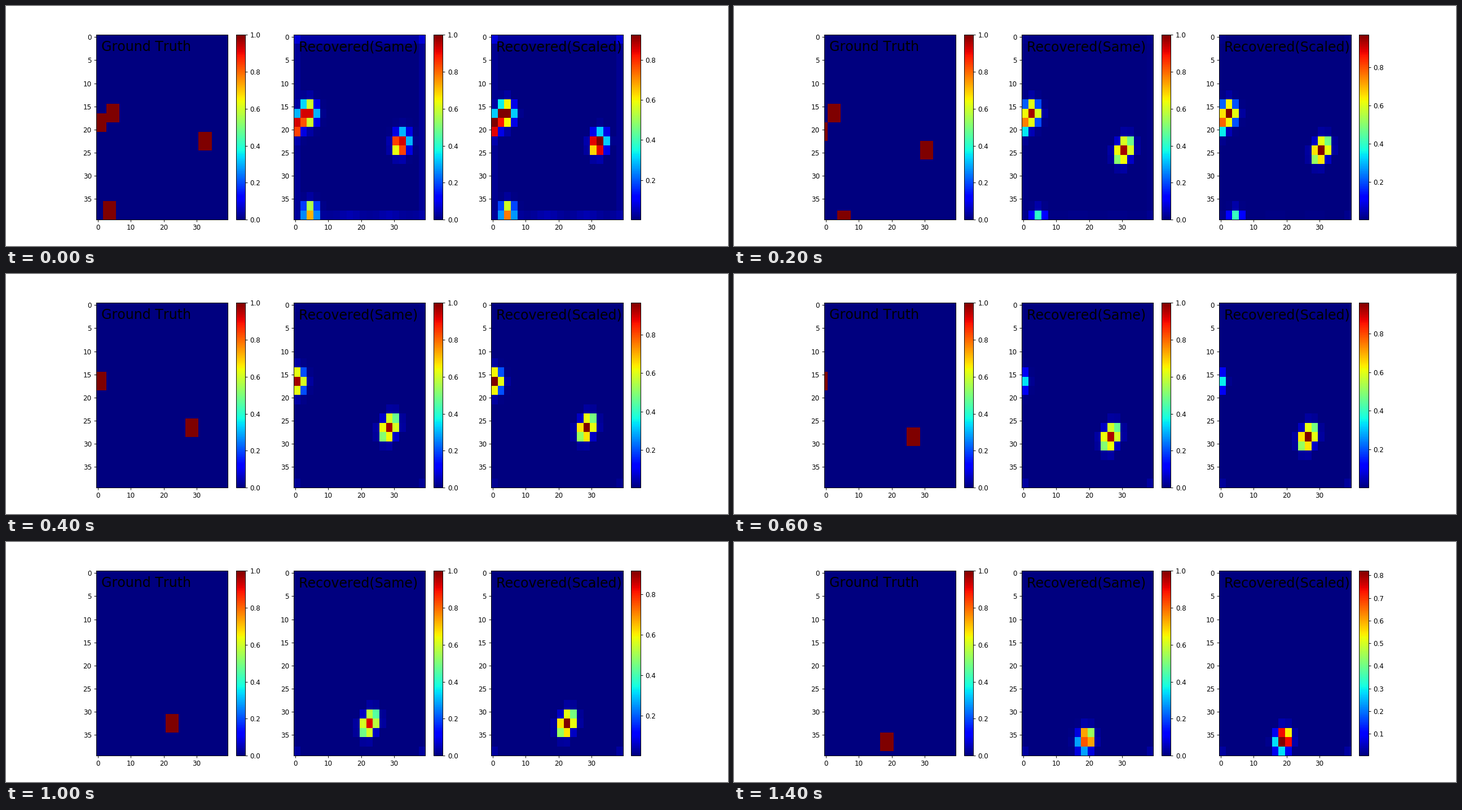
These frames come from a looping animation (1280x427 px, 1500 ms). A matplotlib script:

```python
import matplotlib.pyplot as plt
import numpy as np
from matplotlib.animation import FuncAnimation

STEPS, STEP_MS = 15, 100
N, CELL, SIDE = 40, 2, 4
M = N // CELL
DPI = 64
K = 256 / 3 / DPI  # layout is designed for 85.33 dpi

plt.rcParams.update({
    "font.family": "DejaVu Sans",
    "font.size": 10 * K,
    "text.kerning_factor": 6,
    "axes.linewidth": 0.8 * K,
    "image.cmap": "jet",
})
for axis in ("xtick", "ytick"):
    plt.rcParams[f"{axis}.major.size"] = 3.5 * K
    plt.rcParams[f"{axis}.major.width"] = 0.8 * K
    plt.rcParams[f"{axis}.major.pad"] = 3.5 * K

# Moving squares: start x, start y, x speed, y speed, level
SQUARES = [(3, 15, -1, 0, 1), (-1, 17, -1, 1, 1), (31, 21, -1, 1, 1)]
LEAVING = (2, 36, 1, 1, 1)
LEAVING_SEEN = (3, 36, 0, 1, 0.58)  # the estimate misses its sideways drift


def scene(step, squares, min_visible=1):
    grid = np.zeros((N, N))
    for x, y, vx, vy, level in squares:
        x, y = x + vx * step, y + vy * step
        if x + SIDE >= min_visible and y <= N - min_visible:
            rows = slice(max(y, 0), max(y + SIDE, 0))
            cols = slice(max(x, 0), max(x + SIDE, 0))
            grid[rows, cols] = level
    return grid


def coarse(step):
    """Share of each coarse cell that is covered, within the sequence."""
    step = min(max(step, 0), STEPS - 1)
    grid = scene(step, SQUARES + [LEAVING_SEEN], min_visible=2)
    return grid.reshape(M, CELL, M, CELL).mean(axis=(1, 3))


def haze(step):
    """Weak response along the borders, strongest at the start."""
    grid = np.zeros((M, M))
    grid[:, [0, -1]] = 0.018
    grid[0] = 0.025
    grid[-1] = 0.03 + 0.012 * np.cos((np.arange(M) - 14) * np.pi / 3)
    grid[0, [0, -1]] = 0.075
    grid *= np.exp(-step)
    grid[-1, [0, -1]] += 0.025 * min(step / 6, 1)
    return grid + 0.003


def recovered(step):
    # motion smear, then a contrast curve
    smear = 0.34 * coarse(step - 1) + 0.3 * coarse(step) + 0.36 * coarse(step + 1)
    v = np.minimum(1.2 * smear, 1)
    v = v * v * (3 - 2 * v)

    p = np.pad(v, 1)
    spill = p[:-2, 1:-1] + p[2:, 1:-1] + p[1:-1, :-2] + p[1:-1, 2:]
    peak = 0.97 - 0.045 * np.exp(-2 * step) - 0.15 * (step / (STEPS - 1)) ** 3
    grid = np.maximum(peak * np.maximum(v, 0.05 * spill), haze(step))
    return np.kron(grid, np.ones((CELL, CELL)))


fig, axes = plt.subplots(1, 3, figsize=(1280 / DPI, 427 / DPI), dpi=DPI,
                         gridspec_kw={"right": 0.8999})
images = []
for ax, label in zip(axes, ("Ground Truth", "Recovered(Same)", "Recovered(Scaled)")):
    image = ax.imshow(np.zeros((N, N)), vmin=0, vmax=1, aspect="auto")
    ax.text(1, 3, label, fontsize=20 * K)
    fig.colorbar(image, ax=ax)
    images.append(image)


def draw(step):
    estimate = recovered(step)
    images[0].set_data(scene(step, SQUARES + [LEAVING]))
    for image in images[1:]:
        image.set_data(estimate)
    images[2].set_clim(estimate.min(), estimate.max())
    return images


anim = FuncAnimation(fig, draw, frames=STEPS, interval=STEP_MS,
                     repeat=True, repeat_delay=0, blit=False)
plt.show()
```
